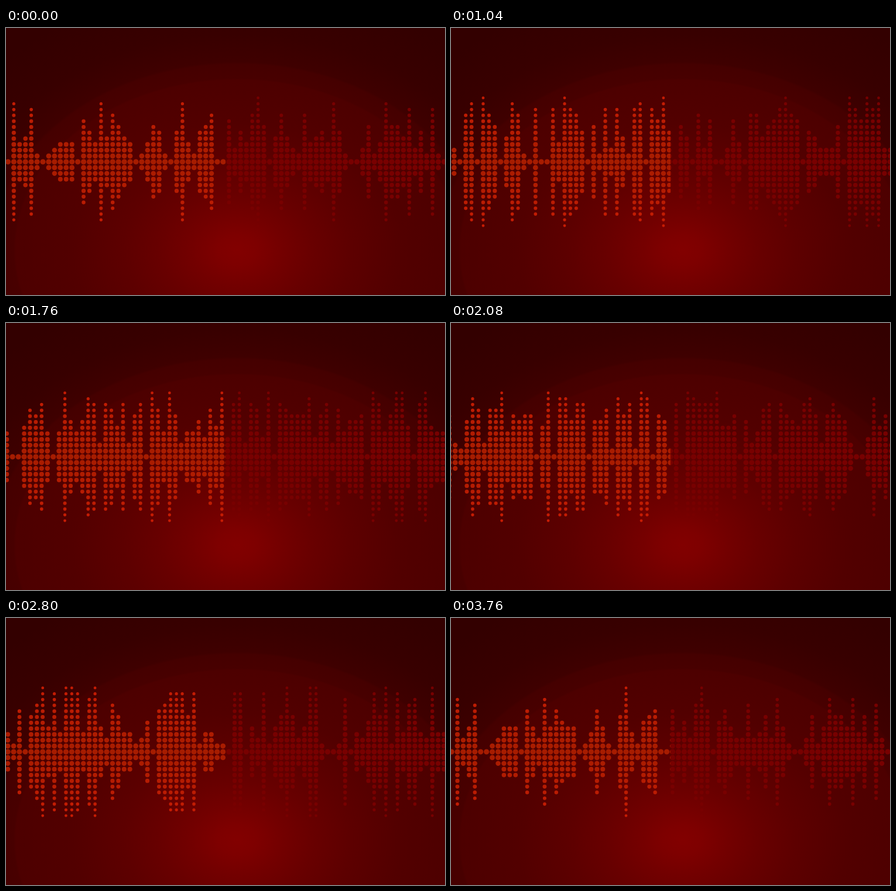
Recreate the animation shown at these times as an HTML page with a canvas. Size 750 px wide and 457 px high, loop 3840 ms.

```html
<!DOCTYPE html>
<html lang="en">
<head>
<meta charset="utf-8">
<title>Dotted equalizer</title>
<style>
  html, body { margin: 0; width: 100%; height: 100%; overflow: hidden; background: #380000; }
  canvas { display: block; }
</style>
</head>
<body>
<canvas id="stage" width="750" height="457"></canvas>
<script>
const W = 750, H = 457;
const STEP_MS = 80, STEPS = 48;
const PITCH = 9.935, SCROLL = 15.905, START_X = 3.4, MID_Y = 229;
const SPLIT_X = 375;

// Step at which each column peaks; -1 marks a column that stays flat.
const PEAKS = [
  23, 3, 17, 14, 5, 21, -1, 26, 28, 31, 31, 31, 24, 38, 13,
  17, 3, 14, 7, 11, 32, 31, -1, 20, 16, 37, 13, 20, 23, 35,
  45, 16, 20, 34, 36, 7, -1, -1, 8, 29, 12, 17, 6, 47, 37,
  23, 33, 7, 32, 18, 27, 40, 17, 15, 35, 17, 3, 13, 26, -1,
  23, 28, 36, 20, 31, 3, 36, 36, 32, 4, 29, 35, 20, 5, 27
];
const TILE = PEAKS.length * PITCH;

const ctx = document.getElementById('stage').getContext('2d');
const backdrop = makeBackdrop();

function makeBackdrop() {
  const canvas = document.createElement('canvas');
  canvas.width = W;
  canvas.height = H;
  const c = canvas.getContext('2d');
  const glow = c.createRadialGradient(0, 0, 0, 0, 0, 450);
  const stops = [
    [0, 130], [25, 126], [60, 115], [100, 104], [150, 93], [218, 82],
    [291, 77], [294, 72], [318, 69], [322, 63], [370, 56], [450, 51]
  ];
  for (const [radius, red] of stops) glow.addColorStop(radius / 450, `rgb(${red},0,0)`);
  c.translate(395, 380);
  c.scale(1.3, 1);
  c.fillStyle = glow;
  c.fillRect(-W, -H, 2 * W, 2 * H);
  return canvas;
}

// Triangle wave from 0 to 11 rows, one cycle per loop.
function columnHeight(peak, step) {
  if (peak < 0) return 0;
  const gap = Math.abs(step - peak - 0.5);
  return Math.floor(12 - Math.min(gap, STEPS - gap) / 2);
}

function addDot(x, y, r) {
  ctx.moveTo(x + r, y);
  ctx.arc(x, y, r, 0, 2 * Math.PI);
}

function addColumn(x, height) {
  for (let row = -height; row <= height; row++) {
    addDot(x, MID_Y + row * PITCH, 4.6 - 0.2 * Math.abs(row));
  }
}

function fillSide(left, right, color) {
  ctx.save();
  ctx.beginPath();
  ctx.rect(left, 0, right - left, H);
  ctx.clip();
  ctx.fillStyle = color;
  ctx.beginPath();
  return () => { ctx.fill(); ctx.restore(); };
}

function drawWave(step, left, right, color) {
  const finish = fillSide(left, right, color);
  PEAKS.forEach((peak, i) => {
    const height = columnHeight(peak, step);
    let x = (START_X + i * PITCH - step * SCROLL) % TILE;
    if (x < -5) x += TILE;
    for (; x < W + 5; x += TILE) addColumn(x, height);
  });
  finish();
}

function litColor() {
  const g = ctx.createLinearGradient(0, 117, 0, 341);
  g.addColorStop(0, '#c81c04');
  g.addColorStop(0.5, '#a61c00');
  g.addColorStop(1, '#c81c04');
  return g;
}

const lit = litColor();

function frame(now) {
  const step = Math.floor(now / STEP_MS) % STEPS;
  ctx.drawImage(backdrop, 0, 0);
  drawWave(step, 0, SPLIT_X, lit);
  drawWave(step, SPLIT_X, W, '#780000');
  requestAnimationFrame(frame);
}

frame(0);
</script>
</body>
</html>
```
